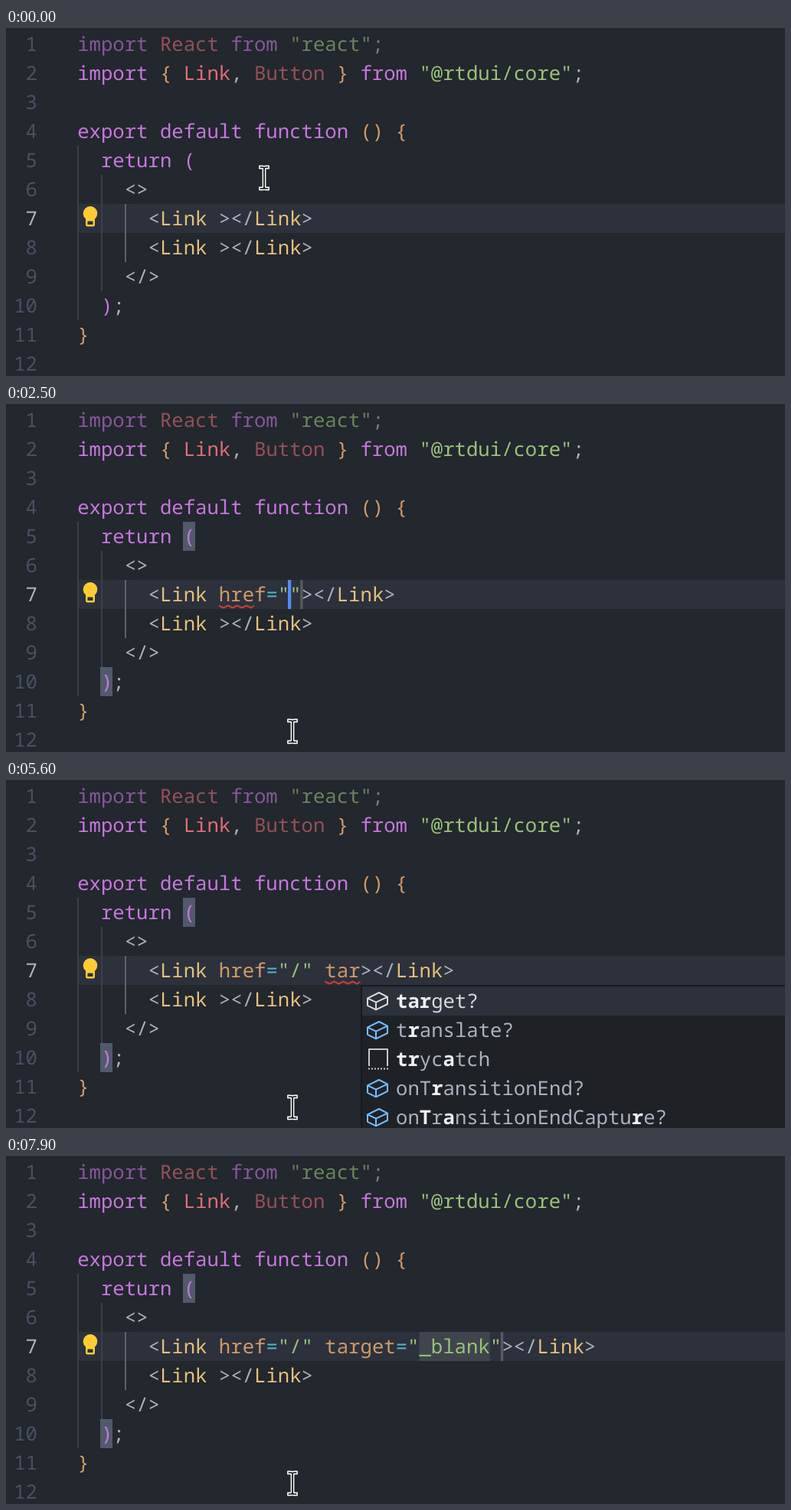
Animation, 1017 px wide and 455 px high, one loop 8 s. Source, as an HTML page:

```html
<!DOCTYPE html>
<html lang="en">
<head>
<meta charset="utf-8">
<title>Attribute completion</title>
<style>
  html, body { margin: 0; width: 100%; height: 100%; overflow: hidden; background: #23272e; }
  svg { display: block; width: 1017px; height: 455px; }
  text {
    font: 25.65px "Noto Sans Mono", "DejaVu Sans Mono", monospace;
    white-space: pre;
    text-rendering: geometricPrecision;
    fill: #abb2bf;
  }
  .num { fill: #495162; }
  .num.on { fill: #abb2bf; }
  .key { fill: #c678dd; }
  .var { fill: #e06c75; }
  .str { fill: #98c379; }
  .gold { fill: #d19a66; }
  .tag { fill: #e5c07b; }
  .op { fill: #56b6c2; }
  .dim { fill-opacity: .6; }
  .picked { fill: #d7dae0; }
  .hit { font-weight: 700; fill: #eceef2; }
  .guide { fill: #3b4048; }
  .guide.on { fill: #5d6169; }
  .icon { fill: none; stroke-width: 1; stroke-linejoin: round; }
</style>
</head>
<body>
<svg viewBox="0 0 1017 455">
  <g id="back"></g>
  <g id="marks"></g>
  <g id="code"></g>
  <g id="live"></g>
  <g id="popup"></g>
  <g id="pointer" fill="none">
    <path id="beam" d="M-4.5-14H-2Q0-14 0-12Q0-14 2-14H4.5M0-12V12M-4.5 14H-2Q0 14 0 12Q0 14 2 14H4.5" stroke="#fff" stroke-width="4.4" stroke-linecap="square"/>
    <use href="#beam"/>
    <path d="M-4.5-14H-2Q0-14 0-12Q0-14 2-14H4.5M0-12V12M-4.5 14H-2Q0 14 0 12Q0 14 2 14H4.5" stroke="#0c0d10" stroke-width="1.7" stroke-linecap="square"/>
  </g>
</svg>
<script>
const CHAR = 15.39, LEFT = 93.2, ROW = 38, LOOP = 8000;
const $ = id => document.getElementById(id);
const colX = col => LEFT + col * CHAR;
const rowY = line => 2 + (line - 1) * ROW;
const esc = s => s.replace(/&/g, '&amp;').replace(/</g, '&lt;').replace(/>/g, '&gt;');
const span = (cls, s) => `<tspan class="${cls}">${esc(s)}</tspan>`;
const text = (x, top, body, cls = '') => `<text x="${x}" y="${top + 28}" class="${cls}">${body}</text>`;
const rect = (x, y, w, h, fill, cls = '') =>
  `<rect x="${x}" y="${y}" width="${w}" height="${h}" class="${cls}"${fill ? ` fill="${fill}"` : ''}/>`;

const link = attrs => esc('<') + span('tag', 'Link') + ' ' + attrs + esc('></') + span('tag', 'Link') + esc('>');

// [line, column, content]
const lines = [
  [1, 0, span('key dim', 'import ') + span('var dim', 'React ') + span('key dim', 'from ') +
    span('str dim', '"react"') + span('dim', ';')],
  [2, 0, span('key', 'import ') + span('gold', '{ ') + span('var', 'Link') + ', ' + span('var dim', 'Button') +
    span('gold', ' } ') + span('key', 'from ') + span('str', '"@rtdui/core"') + ';'],
  [4, 0, span('key', 'export default function ') + span('gold', '() {')],
  [5, 2, span('key', 'return (')],
  [6, 4, esc('<>')],
  [8, 6, link('')],
  [9, 4, esc('</>')],
  [10, 2, span('key', ')') + ';'],
  [11, 0, span('gold', '}')]
];

const guide = (x, from, to, cls = '') => rect(x, rowY(from), 2, ROW * (to - from), '', 'guide ' + cls);
$('back').innerHTML = rect(93, rowY(7), 924, ROW, '#2c313c');

let numbers = '';
for (let n = 1; n <= 12; n++)
  numbers += text(41 - CHAR * String(n).length, rowY(n), n, n === 7 ? 'num on' : 'num');
const bulb = `<path d="M104 249.500A9.300 9.300 0 1 1 116 249.500V257Q116 259.500 113.500 259.500H106.500Q104 259.500 104 257Z" fill="#ffcc33"/>
  <path d="M106.500 252.500H113.500V257H106.500Z" fill="#2c313c"/>`;
$('code').innerHTML = numbers + guide(93, 5, 11) + guide(124, 6, 10) + guide(155, 7, 9, 'on') + bulb +
  lines.map(([n, col, body]) => text(colX(col), rowY(n), body)).join('');

// Square brackets mark the matched letters.
const lists = {
  h: ['[h]idden?', '[h]ref?', '[h]refLang?', 'aria-[h]aspopup?', 'aria-[h]idden?'],
  hr: ['[hr]ef?', '[hr]efLang?', 'suppress[H]yd[r]ationWarning?'],
  hre: ['[hre]f?', '[hre]fLang?'],
  t: ['[t]abIndex?', '[t]arget?', '[t]itle?', '[t]ranslate?', '[t]ype?'],
  ta: ['[ta]bIndex?', '[ta]rget?', '[t]r[a]nslate?', '[t]ryc[a]tch', 'on[T]r[a]nsitionEnd?'],
  tar: ['[tar]get?', 't[r]anslate?', '[tr]yc[a]tch', 'onT[r]ansitionEnd?', 'on[T]r[a]nsitionEndCaptu[r]e?'],
  _: ['[_]blank', '[_]parent', '[_]self', '[_]top'],
  _b: ['[_b]lank'],
  _bl: ['[_bl]ank']
};

const icons = {
  field: 'M1.500 6.200L9 2.500L14.500 5.300V10L7 13.700L1.500 10.900ZM1.500 6.200L7 8.800L14.500 5.300M7 8.800V13.700',
  member: 'M1.700 3.500H14.300V12.500H1.700ZM4 6.500H12M4 9.500H12',
  snippet: 'M2.500 12.500V1.500H14.500V12.500M2 14.200H3M4 14.200H5M6 14.200H7M8 14.200H9M10 14.200H11M12 14.200H13M14 14.200H15'
};

function icon(item, first, x, y) {
  const kind = item.includes('_') || /^\[_/.test(item) ? 'member' : item.endsWith('?') ? 'field' : 'snippet';
  const color = first ? '#d7dae0' : kind === 'snippet' ? '#c5c8ce' : '#75beff';
  return `<path class="icon" transform="translate(${x} ${y}) scale(2)" stroke="${color}" d="${icons[kind]}"/>`;
}

function popup(key, col) {
  if (!key) return '';
  const items = lists[key], x = Math.round(colX(col)) + 1, top = rowY(8);
  let out = rect(x - 1, top, 900, items.length * ROW + 6, '#181a1f') +
    rect(x + 1, top + 2, 900, items.length * ROW + 2, '#1e2227') +
    rect(x + 1, top + 2, 900, ROW, '#2c313a');
  items.forEach((item, i) => {
    const y = top + 2 + i * ROW;
    const label = item.replace(/\[(.+?)\]/g, (_, s) => span('hit', s));
    out += icon(item, !i, x + 5, y + 3) + text(x + 45, y, label, i ? '' : 'picked');
  });
  return out;
}

// Each step overrides what came before it.
const steps = [
  [0, { mouse: [337, 196], attrs: '', caret: 0, list: '', error: null, slot: null, end: 0, focus: false }],
  [100, { mouse: [311, 212] }],
  [200, { mouse: [270, 238] }],
  [300, { mouse: [250, 250] }],
  [500, { mouse: [257, 250] }],
  [600, { mouse: [268, 250] }],
  [700, { mouse: [275, 250] }],
  [900, { focus: true, caret: 12 }],
  [1000, { mouse: [326, 345] }],
  [1100, { mouse: [374, 428] }],
  [1300, { caret: 0 }],
  [1700, { attrs: 'h', caret: 13 }],
  [1800, { list: 'h' }],
  [1900, { attrs: 'hr', caret: 14, list: 'hr' }],
  [2100, { attrs: 'hre', caret: 15, list: 'hre' }],
  [2400, { error: [12, 15] }],
  [2500, { attrs: 'href=""', caret: 18, list: '', slot: [18, 18], end: 19 }],
  [3000, { caret: 0, error: null }],
  [3400, { attrs: 'href="/"', caret: 19, slot: [18, 19], end: 20 }],
  [3900, { caret: 20, slot: null, end: 0 }],
  [4300, { attrs: 'href="/" ', caret: 21 }],
  [4500, { attrs: 'href="/" t', caret: 22, list: 't' }],
  [4700, { attrs: 'href="/" ta', caret: 23, list: 'ta' }],
  [5000, { attrs: 'href="/" tar', caret: 24, list: 'tar' }],
  [5200, { error: [21, 23] }],
  [5500, { error: [21, 24] }],
  [5600, { caret: 0 }],
  [5800, { attrs: 'href="/" target=""', caret: 29, list: '', slot: [29, 29], end: 30 }],
  [6200, { error: null }],
  [6300, { caret: 0 }],
  [6700, { attrs: 'href="/" target="_"', caret: 30, list: '_', slot: [29, 30], end: 31 }],
  [6900, { attrs: 'href="/" target="_b"', caret: 31, list: '_b', slot: [29, 31], end: 32 }],
  [7100, { attrs: 'href="/" target="_bl"', caret: 32, list: '_bl', slot: [29, 32], end: 33 }],
  [7400, { attrs: 'href="/" target="_blank"', caret: 35, list: '', slot: [29, 35], end: 36 }],
  [7900, { caret: 0 }]
];
let state = {};
const states = steps.map(([at, change]) => {
  state = { ...state, ...change };
  // The list stays where it opened while the caret blinks.
  if (state.caret) state.col = state.caret;
  return { at, ...state };
});

const paint = attrs => attrs.replace(/"[^"]*"|=|[a-z]+/g, s =>
  span(s[0] === '"' ? 'str' : s === '=' ? 'op' : 'gold', s));

function squiggle([from, to]) {
  const end = colX(to);
  let x = colX(from), d = `M${x} 263.500`;
  for (let i = 0; x < end - 1; i++) {
    x = Math.min(x + 6, end);
    d += `L${x} ${i % 2 ? 263.5 : 266.5}`;
  }
  return `<path d="${d}" fill="none" stroke="#c24038" stroke-width="2" stroke-linejoin="round"/>`;
}

function draw(s) {
  const y = rowY(7);
  let marks = '';
  if (s.focus) marks += rect(231, rowY(5), 16, ROW, '#515a6b') + rect(123, rowY(10), 16, ROW, '#515a6b');
  if (s.slot) {
    const [from, to] = s.slot.map(colX);
    marks += rect(from, y, Math.max(to - from, 3), ROW, '#40454d') + rect(colX(s.end) - 1.5, y, 3.5, ROW, '#555960');
  }
  $('marks').innerHTML = marks;
  $('live').innerHTML = text(colX(6), y, link(paint(s.attrs))) +
    (s.error ? squiggle(s.error) : '') +
    (s.caret ? rect(Math.round(colX(s.caret) - 2.3), y, 4, ROW, '#528bff') : '');
  $('popup').innerHTML = popup(s.list, s.col);
  $('pointer').setAttribute('transform', `translate(${s.mouse})`);
}

let shown, start;
function tick(now) {
  start ??= now;
  const t = (now - start) % LOOP;
  const next = states.findLast(s => s.at <= t);
  if (next !== shown) draw(shown = next);
  requestAnimationFrame(tick);
}
draw(shown = states[0]);
requestAnimationFrame(tick);
</script>
</body>
</html>
```
